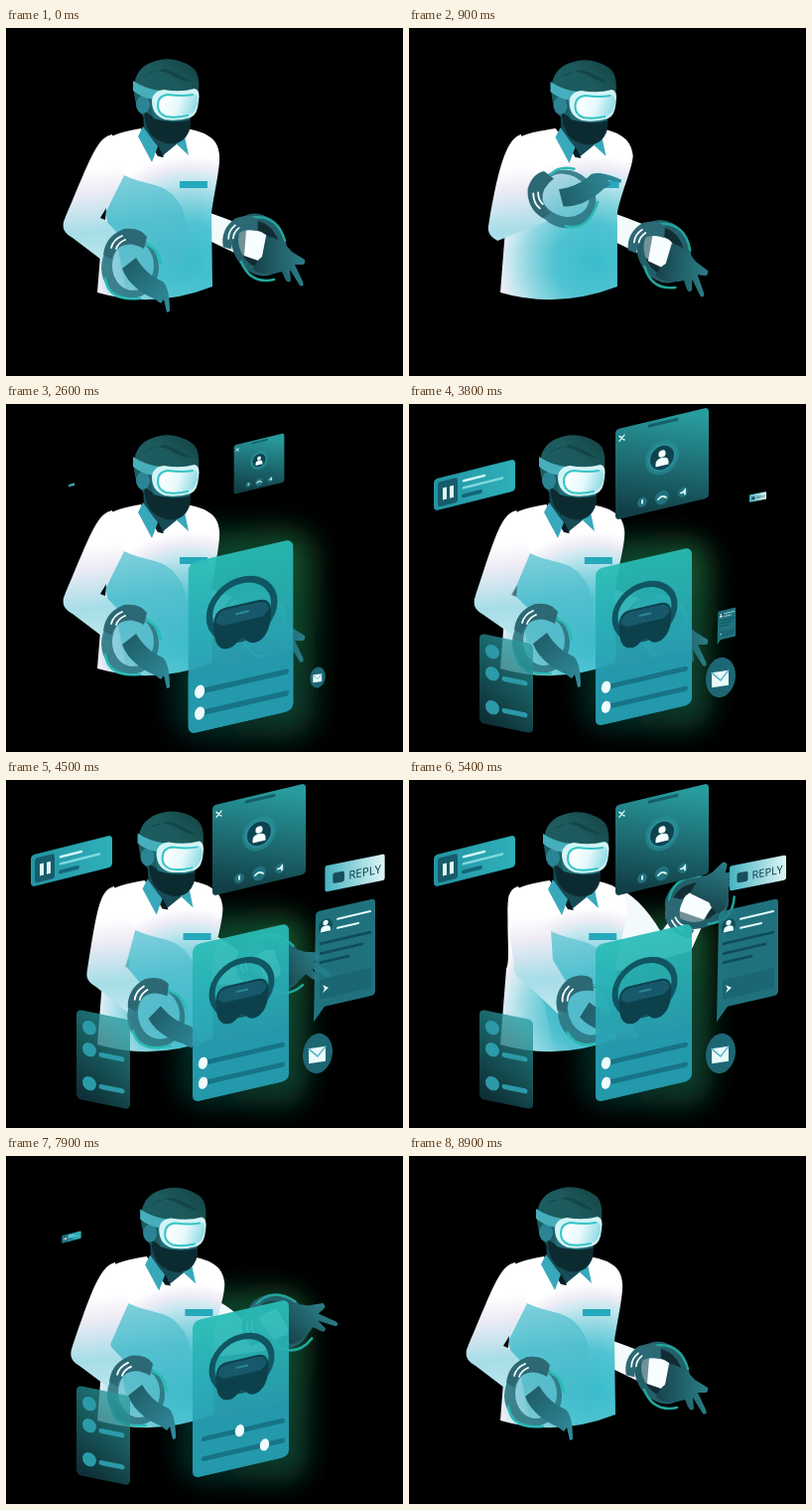
An HTML page for the animation above (9 s loop, 400x350 px).

```html
<!DOCTYPE html>
<html lang="en">
<head>
<meta charset="utf-8">
<title>Virtual interface</title>
<style>
html, body { margin: 0; width: 100%; height: 100%; overflow: hidden; background: #000; }
svg { display: block; }
.l { fill: none; stroke-linecap: round; }
</style>
</head>
<body>
<svg width="400" height="350" viewBox="0 0 400 350">
<defs>
  <radialGradient id="shirt" gradientUnits="userSpaceOnUse" cx="185" cy="235" r="130">
    <stop offset="0" stop-color="#3abccb"/><stop offset=".3" stop-color="#50c3d1"/>
    <stop offset=".5" stop-color="#90d7e2"/><stop offset=".64" stop-color="#c8e8f0"/>
    <stop offset=".73" stop-color="#efecf6"/><stop offset=".82" stop-color="#fff"/>
  </radialGradient>
  <linearGradient id="sleeve" gradientUnits="userSpaceOnUse" x1="80" y1="100" x2="95" y2="240">
    <stop offset=".3" stop-color="#fff"/><stop offset=".45" stop-color="#f0ecf6"/>
    <stop offset=".75" stop-color="#a6dde7"/><stop offset="1" stop-color="#c0e8ee"/>
  </linearGradient>
  <linearGradient id="fold" gradientUnits="userSpaceOnUse" x1="10" y1="0" x2="28" y2="118">
    <stop offset="0" stop-color="#80cfdc"/><stop offset=".4" stop-color="#52c0cf"/>
    <stop offset=".65" stop-color="#48bccb" stop-opacity=".8"/><stop offset="1" stop-color="#40b5c6" stop-opacity="0"/>
  </linearGradient>
  <linearGradient id="hair" x1="0" y1="1" x2="1" y2="0">
    <stop offset="0" stop-color="#1b5e63"/><stop offset=".6" stop-color="#1d5a5d"/><stop offset="1" stop-color="#14413f"/>
  </linearGradient>
  <linearGradient id="visor" x1="0" x2="1" y1=".4" y2=".6">
    <stop offset="0" stop-color="#fff"/><stop offset=".5" stop-color="#e6f9fb"/><stop offset="1" stop-color="#86d8e2"/>
  </linearGradient>
  <linearGradient id="skin" x1="0" y1="0" x2="1" y2="1">
    <stop offset="0" stop-color="#1d5963"/><stop offset="1" stop-color="#318e9f"/>
  </linearGradient>
  <linearGradient id="skinR" x1="0" y1="0" x2="1" y2="0">
    <stop offset="0" stop-color="#17424b"/><stop offset="1" stop-color="#2b7f88"/>
  </linearGradient>
  <linearGradient id="card" x1="0" y1="0" x2="0" y2="1">
    <stop offset="0" stop-color="#28bdb6"/><stop offset=".65" stop-color="#2aa0b4"/><stop offset="1" stop-color="#2097a7"/>
  </linearGradient>
  <linearGradient id="dark" x1=".7" y1="0" x2=".3" y2="1">
    <stop offset="0" stop-color="#289b9e"/><stop offset="1" stop-color="#123f47"/>
  </linearGradient>
  <linearGradient id="side" x1="0" x2="1"><stop offset="0" stop-color="#2494a5"/><stop offset="1" stop-color="#2fb0b9"/></linearGradient>
  <linearGradient id="pale" x1="0" x2="1"><stop offset="0" stop-color="#46b3c0"/><stop offset="1" stop-color="#dff6f7"/></linearGradient>
  <linearGradient id="halo" x1="1" y1="0" x2="0" y2="1">
    <stop offset="0" stop-color="#1c7038" stop-opacity=".75"/><stop offset="1" stop-color="#0a6a64" stop-opacity=".35"/>
  </linearGradient>
  <filter id="blur" x="-50%" y="-50%" width="200%" height="200%"><feGaussianBlur stdDeviation="13"/></filter>
  <g id="person"><circle cy="-4" r="3.6"/><path d="M-6.5 8V5q0-5 6.5-5t6.5 5v3z"/></g>
  <g id="plate">
    <path d="M-27-12Q-25-31-6-38Q10-40 17-30L14-18Q0-26-10-20Q-17-15-19-7Z" fill="#2c6975"/>
    <path class="l" d="M-19-19Q-17-27-8-31M-14-18Q-12-24-5-27" stroke="#fff" stroke-width="1.8"/>
  </g>
</defs>
<rect width="400" height="350"/>
<g id="glow"><rect x="-62" y="-98" width="130" height="192" rx="24" fill="url(#halo)" filter="url(#blur)"/></g>

<path id="armR" fill="#f3fafc"/>
<g id="cuffR">
  <ellipse rx="23" ry="29" transform="rotate(-28)" fill="#1d4c58" fill-opacity=".6" stroke="#235f69" stroke-width="7"/>
  <path d="M-13-15Q4-16 9-7L2 17L-15 11Z" fill="#f8fdff"/>
  <path d="M7-9Q22-7 33 7L46 15Q47 20 43 20L36 20L44 37Q46 43 41 41L31 25L32 36Q29 40 26 34L23 27Q5 33-6 25Q-3 16 3 12Z" fill="url(#skinR)"/>
  <path class="l" d="M-9-27Q18-32 26-4M-18 17Q-9 40 15 35" stroke="#23a59b" stroke-width="2.5"/>
  <use href="#plate" transform="translate(-9 6) rotate(-16) scale(.93)"/>
</g>

<path id="torso" fill="url(#shirt)"/>
<g id="shade"><path d="M0 0C18 9 36 8 47 18C58 28 64 42 63 58L68 116Q40 130 4 124L-6 75L-15 55L-19 38Z" fill="url(#fold)"/></g>
<rect id="pocket" y="154" width="28" height="7" fill="#27a9bd"/>
<path id="armL" fill="url(#sleeve)"/>
<path id="gap"/>
<g id="cuffL">
  <ellipse cx="3" cy="-1" rx="22" ry="25" fill="#63b9c7" fill-opacity=".45"/>
  <path d="M-29 1a29 31 0 1 0 58 0a29 31 0 1 0-58 0ZM-18-1a21 25 0 1 1 42 0a21 25 0 1 1-42 0Z" fill="#2d7783" fill-opacity=".9" fill-rule="evenodd"/>
  <path d="M-8 2L6-9C14 4 22 10 33 15C38 20 40 30 40 45L37 46L34 33L31 37L24 32C14 28-2 18-8 2Z" fill="url(#skin)"/>
  <path class="l" d="M-3-24Q27-28 31-3M-25 12Q-22 35 10 32" stroke="#2abbb5" stroke-width="2.5"/>
  <use href="#plate"/>
</g>

<g id="head">
  <path d="M138 82L139 104L157 129L173 116L178 101L170 80Z" fill="#174b55"/>
  <path d="M153 118L159 130L153 129L150 124Z" fill="#061b20"/>
  <path d="M138 99L148 113L153 119L147 135L133 109ZM171 116L179 104L184 128Z" fill="#38a8bb"/>
  <path d="M130 72Q125 46 143 36Q166 25 187 39Q196 45 194 64L184 88L145 93Q132 87 130 72Z" fill="url(#hair)"/>
  <path d="M139 48Q152 39 166 47Q176 53 186 54Q172 44 159 41" fill="#123f43" opacity=".7"/>
  <path d="M144 62L149 96L185 94L189 70Z" fill="#216e78"/>
  <path d="M139 84Q146 87 149 91Q166 97 186 92Q187 105 178 113Q167 120 154 113Q141 108 139 84Z" fill="#0c2b31"/>
  <ellipse cx="138" cy="77" rx="7" ry="9" fill="#2b8494"/>
  <path d="M128 53Q140 61 155 63L149 72Q136 70 128 63Z" fill="#46afbb"/>
  <path d="M147 73Q148 63 159 62Q176 65 190 61Q196 62 194 74Q193 87 186 90Q173 94 160 92Q147 88 147 73Z" fill="#d3f4f6"/>
  <path d="M153 78Q153 68 163 67Q178 69 190 66Q194 68 193 75Q191 86 184 88Q171 91 161 89Q153 86 153 78Z" fill="url(#visor)"/>
  <path class="l" d="M188 67Q178 69 163 67Q153 68 153 78Q153 86 161 89Q171 91 183 88" stroke="#35c4c6" stroke-width="2"/>
</g>

<g id="call">
  <rect x="-47" y="-45.5" width="94" height="91" rx="4" fill="url(#dark)"/>
  <path class="l" d="M-43-38l5 5m0-5l-5 5" stroke="#e8ffff" stroke-width="1.3"/>
  <path class="l" d="M-13-41H15" stroke="#155f68" stroke-width="3"/>
  <circle cy="-6" r="17" fill="#2b96a0" opacity=".5"/><circle cy="-6" r="13" fill="#0e4350" stroke="#2c8d9b" stroke-width="2"/>
  <use href="#person" y="-6" fill="#f5ffff"/>
  <g fill="#20717d"><circle cx="-20" cy="34" r="5"/><circle cy="34" r="7"/><circle cx="21" cy="34" r="5"/></g>
  <path class="l" d="M-4 35Q0 31 4 35M-20 32v3M19 34h2l2-2v4" stroke="#dffafa" stroke-width="1.8"/>
</g>

<g id="mini">
  <rect x="-41" y="-16" width="82" height="32" rx="4" fill="url(#side)"/>
  <rect x="-37" y="-12" width="20" height="25" rx="3" fill="#165c6b"/>
  <path d="M-32-5h4v12h-4zM-25-5h4v12h-4z" fill="#e2f5f6"/>
  <path class="l" d="M-11-7H10" stroke="#d3f6f6" stroke-width="2.5"/>
  <path class="l" d="M-11 0H28" stroke="#7cdadd" stroke-width="2.5"/>
  <path class="l" d="M-11 8H6" stroke="#146878" stroke-width="4"/>
</g>

<g id="list">
  <rect x="-27" y="-45" width="54" height="90" rx="5" fill="url(#dark)" opacity=".78"/>
  <g fill="#2c9aa8"><circle cx="-14" cy="-29" r="7"/><circle cx="-14" cy="-7" r="7"/><circle cx="-14" cy="27" r="7"/></g>
  <path class="l" d="M-2-4H19M-2 28H19" stroke="#2c9aa8" stroke-width="5"/>
</g>

<g id="chat">
  <path d="M5-108H57Q61-108 61-104V-15Q61-11 57-11H10L-1 2L1-104Q1-108 5-108Z" fill="#237f8b" opacity=".9"/>
  <circle cx="11" cy="-92" r="7" fill="#124e5b"/><use href="#person" transform="translate(11 -92) scale(.75)" fill="#eaffff"/>
  <path class="l" d="M23-96H56M23-87H44" stroke="#eaffff" stroke-width="2"/>
  <path class="l" d="M6-75H56M6-65H48M6-56H34" stroke="#0f4c5a" stroke-width="2.8"/>
  <rect x="5" y="-39" width="52" height="20" rx="2" fill="#1a6674"/>
  <path d="M8-33l6 4-6 4 2-4z" fill="#eaffff"/>
</g>

<g id="mail">
  <ellipse rx="15" ry="20" fill="#1d6673"/>
  <path d="M-9-6H8V9H-9Z" fill="#e9fafb"/><path class="l" d="M-9-6L0 3L8-6" stroke="#57b2be" stroke-width="1.5"/>
</g>

<g id="main">
  <rect x="-48.5" y="-79" width="97" height="158" rx="7" fill="url(#card)" opacity=".93"/>
  <path d="M-48.5 24H48.5V72Q48.5 79 41 79H-41Q-48.5 79-48.5 72Z" fill="#2499ab"/>
  <ellipse cx="1" cy="-25" rx="30" ry="27" fill="none" stroke="#0f5662" stroke-width="6"/>
  <path d="M-25-16Q-25-30-14-30H17Q28-30 28-17Q28 3 17 8Q9 10 5 4Q1 0-3 4Q-9 11-17 7Q-25 3-25-16Z" fill="#0c414c"/>
  <path d="M-23-18Q-23-28-13-28H16Q26-28 26-19L20-14H-17Z" fill="#17586a"/>
  <path class="l" d="M-4-22H7" stroke="#2b8796" stroke-width="2"/>
  <path class="l" d="M-37 42H42M-37 62H42" stroke="#167486" stroke-width="5"/>
  <ellipse id="knob1" cy="42" rx="4.7" ry="6" fill="#effbfc"/><ellipse id="knob2" cy="62" rx="4.7" ry="6" fill="#effbfc"/>
</g>

<g id="reply">
  <rect x="-28.5" y="-12.5" width="57" height="25" rx="2" fill="url(#pale)"/>
  <rect x="-21" y="-4" width="11" height="10" rx="2" fill="#174e5c"/>
  <text x="-6" y="5" font-family="'Open Sans', sans-serif" font-size="11" font-weight="500" fill="#0c3b48">REPLY</text>
</g>
</svg>
<script>
const $ = id => document.getElementById(id);
const set = (id, name, value) => $(id).setAttribute(name, value);
const clamp = x => Math.max(0, Math.min(1, x));
const mix = (a, b, p) => a + (b - a) * p;
const ease = p => p * p * (3 - 2 * p);
const backOut = p => 1 + 2.7 * (p - 1) ** 3 + 1.7 * (p - 1) ** 2;

// head x y, elbow x y, left cuff x y angle, fold x y alpha, right cuff x y angle, right arm raise
const rest = [0, 0, 58, 195, 125, 240, 0, 119, 148, 1, 255, 218, 0, 0];
const point = [15, 1, 81, 198, 158, 169, -69, 128, 150, 0, 257, 225, 6, 0];
const lean = [3, 0, 66, 196, 133, 239, 0, 122, 150, 1, 255, 222, 0, 0];
const press = [7, 1, 106, 186, 179, 234, -20, 143, 152, 1, 290, 123, -75, 1];
const slide = [13, 1, 72, 196, 136, 238, 0, 127, 148, 1, 290, 124, -73, 1];
const keys = [[0, rest], [100, rest], [1000, point], [2000, point], [2500, rest], [3000, rest], [3700, lean],
  [4200, lean], [4900, press], [5600, press], [6300, slide], [7200, slide], [8700, rest], [9000, rest]];

// anchor x y, slope, start, rise time, end
const panels = {
  glow: [236, 234, 0, 2200, 600, 8150], main: [236.5, 234, -.23, 2200, 600, 8150],
  call: [255, 60, -.24, 2516, 600, 7400], mini: [66, 81.5, -.25, 2590, 600, 7550],
  mail: [314, 275, -.15, 2520, 600, 7300], list: [98, 281, .2, 3000, 600, 7950],
  chat: [311, 241, -.23, 3758, 600, 7000], reply: [351.5, 93.5, -.2, 3730, 1000, 6680]
};

function poseAt(t) {
  const i = keys.findIndex(k => k[0] > t);
  const [t0, a] = keys[i - 1], [t1, b] = keys[i];
  const p = ease((t - t0) / (t1 - t0));
  return a.map((v, j) => mix(v, b[j], p));
}

// Place a cuff-relative point on the stage
function turn(x, y, cx, cy, deg) {
  const r = deg * Math.PI / 180, c = Math.cos(r), s = Math.sin(r);
  return `${cx + x * c - y * s} ${cy + x * s + y * c}`;
}

function drawFigure(t) {
  const [hx, hy, ex, ey, cx, cy, ca, sx, sy, sa, rx, ry, ra, up] = poseAt(t);
  const k = hx / 15;
  set('head', 'transform', `translate(${hx} ${hy})`);
  set('torso', 'd', `M${136 + 12 * k} 101C${120 + 10 * k} 104 ${106 + 6 * k} 106 ${98 + 6 * k} 116
    C97 150 103 180 98 190L92 266Q150 283 ${208 + 2 * k} 260L${207 + 3 * k} 186
    C${210 + 4 * k} 165 ${216 + 10 * k} 140 ${215 + 11 * k} 128
    C${214 + 10 * k} 110 ${200 + 10 * k} 104 ${180 + 12 * k} 101L${157 + 14 * k} 130Z`);
  set('pocket', 'x', 175 + hx * .6 + up * 2);
  set('shade', 'transform', `translate(${sx} ${sy})`);
  set('shade', 'opacity', sa);
  set('armL', 'd', `M${107 + 6 * k} 107C${91 + 10 * k} 111 ${mix(95, ex, .25)} 130 ${ex} ${ey}
    C${ex - 2} ${ey + 9} ${ex + 4} ${ey + 13} ${ex + 9} ${ey + 16}
    L${turn(-25, -4, cx, cy, ca)}L${turn(-7, -28, cx, cy, ca)}L${ex + 39} ${ey - 5}L${sx} ${sy}Z`);
  set('gap', 'd', `M${ex + 43} ${ey - 14}l-6 10l5 2z`);
  set('gap', 'opacity', sa * clamp(1 - 3 * k));
  set('cuffL', 'transform', `translate(${cx} ${cy}) rotate(${ca})`);
  set('cuffR', 'transform', `translate(${rx} ${ry}) rotate(${ra})`);
  const between = (x0, y0, x1, y1) => `${mix(x0, x1, up)} ${mix(y0, y1, up)}`;
  set('armR', 'd', `M${between(203, 185, 208, 108)}Q${between(220, 191, 232, 116)} ${between(235, 197, 254, 153)}
    L${turn(5, -10, rx, ry, ra)}L${turn(-5, 14, rx, ry, ra)}
    L${between(230, 226, 284, 172)}L${between(203, 213, 200, 195)}Z`);
}

function drawPanels(t) {
  for (const [id, [x, y, slope, start, rise, end]] of Object.entries(panels)) {
    const s = t < start ? 0 : Math.max(0, backOut(clamp((t - start) / rise))) * (1 - clamp((t - end) / 400) ** 2);
    set(id, 'visibility', s > .01 ? 'visible' : 'hidden');
    set(id, 'transform', `translate(${x} ${y}) scale(${s}) matrix(1 ${slope} 0 1 0 0)`);
  }
  set('knob1', 'cx', mix(-38, -1, ease(clamp((t - 6100) / 500))));
  set('knob2', 'cx', mix(-38, 24, ease(clamp((t - 6300) / 500))));
}

const begin = performance.now();
function frame() {
  const t = Math.floor((performance.now() - begin) % 9000 / 100) * 100;
  drawFigure(t);
  drawPanels(t);
  requestAnimationFrame(frame);
}
frame();
</script>
</body>
</html>
```
